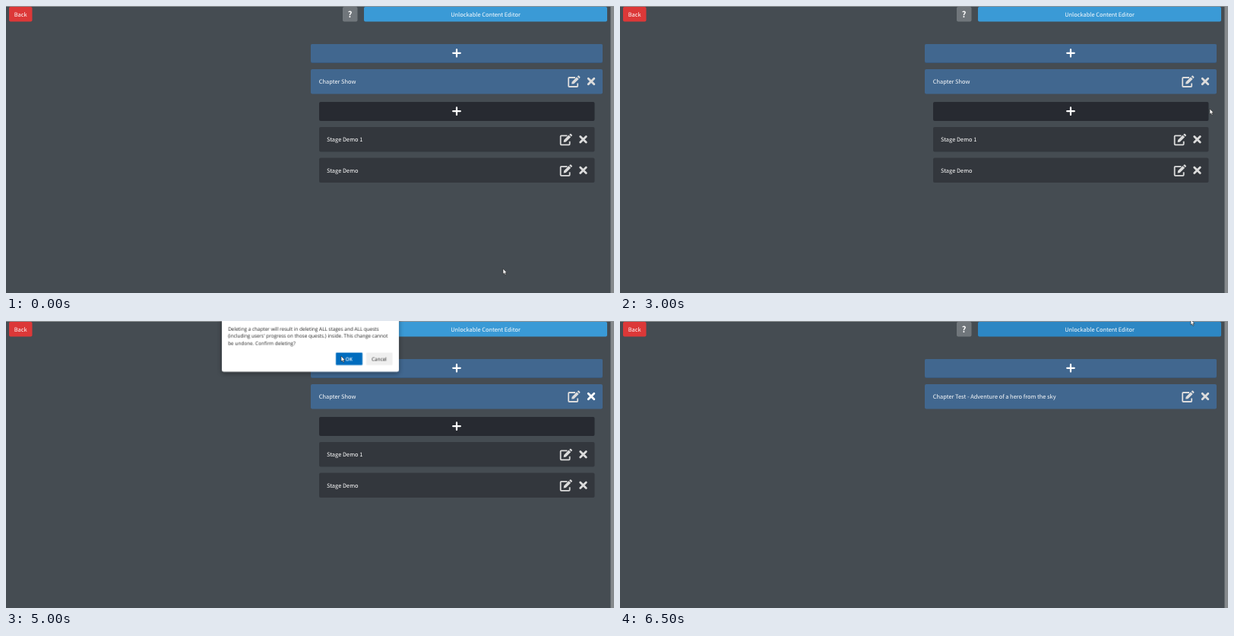
An HTML page for the animation above (6.6 s loop, 800x377 px).

```html
<!DOCTYPE html>
<html lang="en">
<head>
<meta charset="utf-8">
<title>Unlockable Content Editor</title>
<style>
  html, body { margin: 0; width: 100%; height: 100%; overflow: hidden; background: #454c52; }
  svg { display: block; width: 100%; height: 100%; }
  text {
    font: 7.44px "Noto Sans CJK JP", "Noto Sans CJK SC", "Noto Sans CJK", "Noto Sans", sans-serif;
    fill: #fff; text-rendering: geometricPrecision;
  }
  .mid { text-anchor: middle; }
  .help { font-size: 11px; font-weight: 700; }
  .dialog text { font: 6.44px "Open Sans", "Noto Sans", sans-serif; fill: #222; }
  .dialog .ok-label { fill: #fff; font-weight: 600; }
  .blue { fill: #41678f; }
  .stage { fill: #33373d; }
  .icon { fill: #dcdcdc; stroke: #dcdcdc; }

  /* One loop is 6.6 s, advancing in ticks of 100 ms */
  .cursor, .arrow, .hand, .old, .line, .new, .dialog, .ok, .close, .title, .thumb {
    animation: 6.6s step-end infinite;
  }
  .cursor { animation-name: move; }
  .arrow { animation-name: arrow; }
  .hand { animation-name: hand; }
  .old { animation-name: old; }
  .line { animation-name: line; }
  .new { animation-name: new; }
  .dialog { animation-name: dialog; transform-origin: 400.5px 0; }
  .ok { animation-name: ok; }
  .close { animation-name: close; }
  .title { animation-name: title; }
  .thumb { animation-name: thumb; }

  @keyframes move {
    0% { transform: translate(654px, 345px); }
    28.78% { transform: translate(654px, 345px); animation-timing-function: steps(7); }
    39.39% { transform: translate(789px, 215px); animation-timing-function: steps(2); }
    42.42% { transform: translate(797px, 160px); animation-timing-function: steps(2); }
    45.45% { transform: translate(776px, 135px); animation-timing-function: steps(3); }
    50% { transform: translate(769px, 97px); }
    56.06% { transform: translate(769px, 97px); animation-timing-function: steps(4); }
    62.12% { transform: translate(474px, 75px); }
    63.63% { transform: translate(474px, 75px); animation-timing-function: steps(3); }
    68.18% { transform: translate(441px, 46px); }
    84.84% { transform: translate(440.5px, 47px); }
    92.42% { transform: translate(440.5px, 47px); animation-timing-function: steps(4); }
    98.48%, 100% { transform: translate(751px, -2px); }
  }
  @keyframes arrow { 0%, 63.63%, 100% { opacity: 1; } 48.48% { opacity: 0; } }
  @keyframes hand { 0%, 63.63%, 100% { opacity: 0; } 48.48% { opacity: 1; } }
  @keyframes old { 0% { opacity: 1; } 78.78%, 100% { opacity: 0; } }
  @keyframes line { 0%, 83.33%, 100% { opacity: 0; } 78.78% { opacity: 1; } }
  @keyframes new { 0% { opacity: 0; } 83.33%, 100% { opacity: 1; } }
  @keyframes dialog {
    0% { opacity: 0; transform: none; }
    53.03% { opacity: .6; transform: translateY(-4px); }
    54.54% { opacity: 1; transform: none; }
    78.78% { opacity: .68; transform: translateY(-5px) scale(1.008); }
    80.3%, 100% { opacity: 0; transform: none; }
  }
  @keyframes ok { 0% { fill: #0078d4; } 66.66%, 100% { fill: #006cbe; } }
  @keyframes close { 0% { stroke: #dcdcdc; } 48.48%, 100% { stroke: #fff; } }
  @keyframes title { 0% { fill: #3a9ad6; } 96.96%, 100% { fill: #2d87c4; } }
  @keyframes thumb { 0%, 43.93%, 100% { fill: #868a8d; } 40.9% { fill: #75797c; } }
</style>
</head>
<body>
<svg viewBox="0 0 800 377" preserveAspectRatio="none">
  <defs>
    <filter id="shadow" x="-10%" y="-20%" width="120%" height="150%">
      <feDropShadow dx="0" dy="2" stdDeviation="3" flood-opacity=".4"/>
    </filter>
    <path id="plus" d="M-4.8 0H4.8M0-4.8V4.8" stroke="#fff" stroke-width="2.2" stroke-linecap="round"/>
    <path id="cross" d="M-3.8-3.8 3.8 3.8M3.8-3.8-3.8 3.8" stroke-width="2.8" stroke-linecap="round"/>
    <g id="edit" transform="translate(-8.5 -8)">
      <path fill="none" stroke-width="1.8" d="M10 3H2.2a1 1 0 0 0-1 1v10a1 1 0 0 0 1 1h10a1 1 0 0 0 1-1v-3.6"/>
      <path stroke="none" d="M5.2 11.6 5.6 8.7 12 2.3l2.6 2.6-6.4 6.4ZM12.7 1.6l.9-.9a1 1 0 0 1 1.4 0l1.2 1.2a1 1 0 0 1 0 1.4l-.9.9Z"/>
    </g>
  </defs>

  <rect width="800" height="377" fill="#454c52"/>
  <rect width="800" height="1" fill="#8f9396"/>
  <rect class="thumb" x="795.5" y="1" width="4.5" height="376"/>

  <rect x="4" y="1" width="30.5" height="19.5" rx="2" fill="#dc3838"/>
  <text class="mid" x="19.2" y="13.8">Back</text>
  <rect x="443" y="1" width="19.5" height="19.5" rx="2" fill="#70767b"/>
  <text class="mid help" x="452.7" y="15">?</text>
  <rect class="title" x="471" y="1" width="320" height="19.5" rx="2"/>
  <text class="mid" x="631" y="13.8">Unlockable Content Editor</text>

  <rect x="401" y="50" width="384" height="25" rx="2" fill="#385a7e"/>
  <rect class="blue" x="401" y="50" width="384" height="24" rx="2"/>
  <use href="#plus" x="593" y="61.8"/>
  <path class="line" d="M401 83.5H785" stroke="#717981"/>

  <g class="old">
    <rect class="blue" x="401" y="83" width="384" height="32.5" rx="2"/>
    <text x="411.8" y="101.8">Chapter Show</text>
    <use class="icon" href="#edit" x="747.5" y="99"/>
    <use class="close" href="#cross" x="770" y="99"/>

    <rect x="412" y="126" width="362.5" height="25" rx="2" fill="#272a31"/>
    <use href="#plus" x="593" y="138.2"/>

    <rect class="stage" x="412" y="159" width="362.5" height="32.5" rx="2"/>
    <text x="422" y="178.2">Stage Demo 1</text>
    <use class="icon" href="#edit" x="737" y="175.3"/>
    <use class="icon" href="#cross" x="759.5" y="175.3"/>

    <rect class="stage" x="412" y="199.5" width="362.5" height="32.5" rx="2"/>
    <text x="422" y="218.8">Stage Demo</text>
    <use class="icon" href="#edit" x="737" y="215.8"/>
    <use class="icon" href="#cross" x="759.5" y="215.8"/>
  </g>

  <g class="new">
    <rect class="blue" x="401" y="83" width="384" height="32.5" rx="2"/>
    <text x="411.8" y="101.8">Chapter Test - Adventure of a hero from the sky</text>
    <use class="icon" href="#edit" x="747.5" y="99"/>
    <use class="icon" href="#cross" x="770" y="99"/>
  </g>

  <g class="dialog">
    <rect x="284" y="-10" width="233" height="76.5" rx="2.5" fill="#fff" filter="url(#shadow)"/>
    <text x="292" y="12.8">Deleting a chapter will result in deleting ALL stages and ALL quests</text>
    <text x="292" y="22.1">(including users' progress on those quests.) inside. This change cannot</text>
    <text x="292" y="31.4">be undone. Confirm deleting?</text>
    <rect class="ok" x="434" y="41.5" width="35" height="16.5" rx="1"/>
    <text class="mid ok-label" x="451.3" y="52">OK</text>
    <rect x="474" y="41.5" width="34.5" height="16.5" rx="1" fill="#efefef"/>
    <text class="mid" x="491" y="52">Cancel</text>
  </g>

  <g class="cursor" stroke="#222" stroke-width=".6" fill="#fff" stroke-linejoin="round">
    <path class="arrow" d="M0 0V7.2L1.6 5.8 2.8 8.3 4 7.8 2.9 5.3H5Z"/>
    <path class="hand" d="M-.8.8a.8.8 0 0 1 1.6 0V3.4L3.6 4Q4.4 4.2 4.3 5L3.8 7.3V9H-.4V7.8L-2.2 5.5Q-2.4 4.6-1.6 4.7L-.8 5.3Z"/>
  </g>
</svg>
</body>
</html>
```
